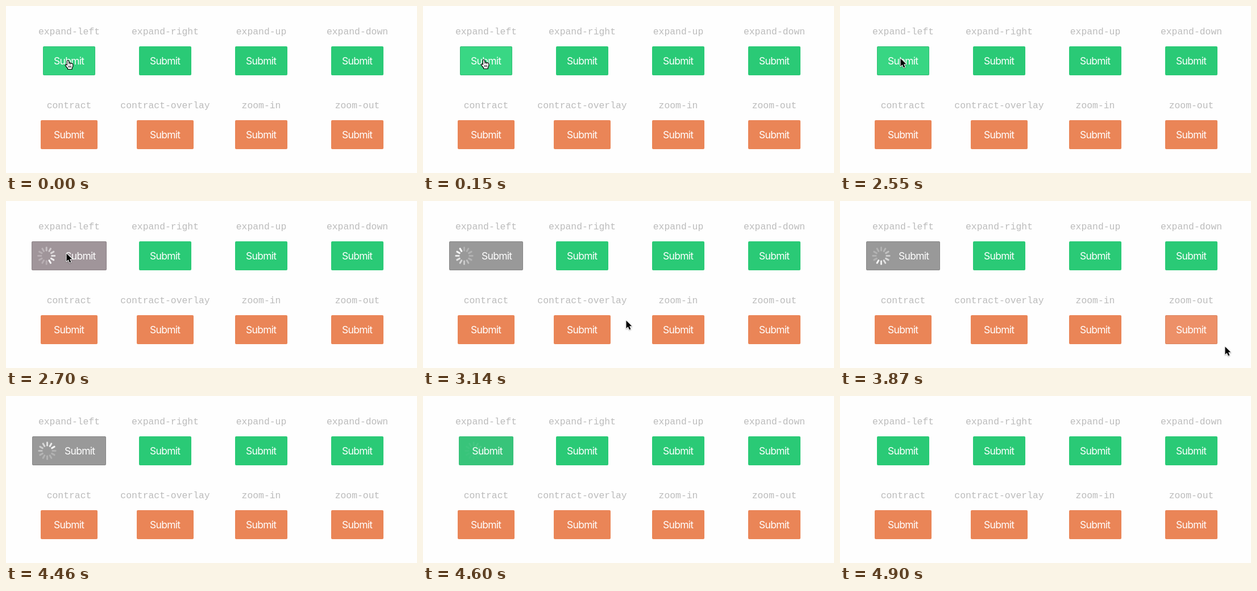
An HTML page with a canvas for the animation above (5.35 s loop, 723 px wide and 294 px high).

```html
<!DOCTYPE html>
<html lang="en">
<head>
<meta charset="utf-8">
<title>Loading buttons</title>
<style>
  html, body { margin: 0; width: 100%; height: 100%; overflow: hidden; background: #fefefe; }
  canvas { display: block; }
</style>
</head>
<body>
<canvas id="stage" width="723" height="294"></canvas>
<script>
const ctx = document.getElementById('stage').getContext('2d');
const LOOP = 5350;
const FADE = 300;
const STEPS = [0, 150, 2550, 2700, 2840, 2990, 3140, 3290, 3430, 3580, 3730,
  3870, 4020, 4160, 4310, 4460, 4600, 4750, 4900];

const GREEN = [42, 202, 118], GREEN_HOVER = [56, 214, 131];
const ORANGE = [234, 133, 87], ORANGE_HOVER = [239, 149, 112];
const GRAY = [153, 153, 153];

// label, centre x, top y, width, colour
const BUTTONS = [
  ['expand-left', 111, 71, 92, GREEN],
  ['expand-right', 280, 71, 92, GREEN],
  ['expand-up', 449, 71, 92, GREEN],
  ['expand-down', 618, 71, 92, GREEN],
  ['contract', 111, 201, 100, ORANGE],
  ['contract-overlay', 280, 201, 100, ORANGE],
  ['zoom-in', 449, 201, 92, ORANGE],
  ['zoom-out', 618, 201, 92, ORANGE]
];

// time, shape, tip x, tip y
const POINTER = [
  [0, 'hand', 109, 95], [150, 'hand', 107, 94], [2550, 'arrow', 106, 92],
  [3140, 'arrow', 357, 210], [3430, 'arrow', 447, 203], [3580, 'arrow', 579, 203],
  [3730, 'hand', 611, 211], [3870, 'arrow', 677, 256], [4160, 'arrow', 636, 280],
  [4310, null, 0, 0]
];

const ARROW = new Path2D('M.5 .5V14.2L3.7 11.2L6 16.4L8.4 15.4L6.1 10.3H10.4Z');
const HAND = new Path2D('M-1.6 9V1.8Q-1.5 .5 -.2 .5Q1.2 .5 1.4 1.8L1.9 5.2' +
  'Q3.6 4.3 4.5 5.8Q6 5.1 6.7 6.5Q8.6 6 8.7 8V11.2L7.2 14.6V16.5H-.4V15' +
  'L-4.4 10.2Q-5.2 8.6 -3.8 8.2Q-2.8 8 -1.6 9Z');

const clamp = (v, lo, hi) => Math.min(hi, Math.max(lo, v));
const mix = (a, b, k) => a.map((v, i) => v + (b[i] - v) * k);
const rgb = c => `rgb(${c.map(v => Math.round(clamp(v, 0, 255))).join(',')})`;
const curve = (u, a, b) => 3 * (1 - u) ** 2 * u * a + 3 * (1 - u) * u * u * b + u ** 3;

// cubic-bezier(.175, .885, .32, 1.275)
function spring(t, start) {
  const x = clamp((t - start) / FADE, 0, 1);
  if (x === 0 || x === 1) return x;
  let lo = 0, hi = 1;
  for (let i = 0; i < 24; i++) {
    const mid = (lo + hi) / 2;
    if (curve(mid, .175, .32) < x) lo = mid; else hi = mid;
  }
  return curve(lo, .885, 1.275);
}

function drawLabel(text, x, y) {
  ctx.font = '16.4px "Liberation Mono", monospace';
  ctx.letterSpacing = '0px';
  ctx.fillStyle = '#bbb';
  ctx.fillText(text, x, y);
}

function drawButton(x, y, w, color, edge, textX) {
  const left = Math.round(x - w / 2);
  const width = Math.round(x + w / 2) - left;
  ctx.fillStyle = rgb(color);
  ctx.beginPath();
  ctx.roundRect(left, y, width, 51, 2);
  ctx.fill();
  if (edge > 0) {
    ctx.strokeStyle = `rgba(0,0,0,${0.12 * Math.min(edge, 1)})`;
    ctx.lineWidth = 1;
    ctx.beginPath();
    ctx.roundRect(left + .5, y + .5, width - 1, 50, 1.5);
    ctx.stroke();
  }
  ctx.font = '17.5px Inter, sans-serif';
  ctx.letterSpacing = '-0.7px';
  ctx.fillStyle = '#fff';
  ctx.fillText('Submit', textX - .35, y + 32);
}

function drawSpinner(x, y, t, alpha) {
  const head = 11 / 12 + (t - 3140) / 1000;
  ctx.save();
  ctx.translate(x, y);
  ctx.fillStyle = '#fff';
  for (let i = 0; i < 12; i++) {
    const lag = (((head - i / 12 + .001) % 1) + 1) % 1;
    ctx.globalAlpha = alpha * Math.max(.25, 1 - .75 * lag / .6);
    ctx.beginPath();
    ctx.roundRect(-1.5, -16, 3, 8, 1.2);
    ctx.fill();
    ctx.rotate(Math.PI / 6);
  }
  ctx.restore();
}

function drawPointer(t) {
  const [, shape, x, y] = POINTER.findLast(p => p[0] <= t);
  if (!shape) return;
  ctx.save();
  ctx.translate(x, y);
  ctx.lineJoin = 'round';
  if (shape === 'arrow') {
    ctx.shadowColor = 'rgba(0,0,0,.3)';
    ctx.shadowBlur = 2;
    ctx.shadowOffsetY = 1;
    ctx.strokeStyle = '#fff';
    ctx.lineWidth = 2;
    ctx.stroke(ARROW);
    ctx.shadowColor = 'transparent';
    ctx.fillStyle = '#000';
    ctx.fill(ARROW);
  } else {
    ctx.fillStyle = '#fff';
    ctx.fill(HAND);
    ctx.strokeStyle = '#000';
    ctx.lineWidth = 1.2;
    ctx.stroke(HAND);
    ctx.lineWidth = .9;
    ctx.beginPath();
    for (const gx of [1.2, 3.2, 5.2]) {
      ctx.moveTo(gx, 10);
      ctx.lineTo(gx, 13.5);
    }
    ctx.moveTo(1.9, 5.2);
    ctx.lineTo(2, 8);
    ctx.moveTo(4.5, 5.8);
    ctx.lineTo(4.6, 8.2);
    ctx.stroke();
  }
  ctx.restore();
}

function draw(t) {
  ctx.fillStyle = '#fefefe';
  ctx.fillRect(0, 0, 723, 294);
  ctx.textAlign = 'center';

  const busy = spring(t, 2550) - spring(t, 4520);
  const loaded = t >= 4520;
  const hover = loaded ? 0 : spring(t, -50);
  const zoomHover = spring(t, 3560) - spring(t, 3850);

  for (const [label, x, y, w, base] of BUTTONS) {
    drawLabel(label, x, y - 21);
    if (label === 'expand-left') {
      const width = w + 38 * busy;
      const color = mix(mix(base, GREEN_HOVER, hover), GRAY, busy);
      drawButton(x, y, width, color, loaded ? busy : hover, x + 19 * busy);
      if (busy > 0) drawSpinner(x - width / 2 + 26.5, y + 25.5, t, Math.min(busy, 1));
    } else if (label === 'zoom-out') {
      drawButton(x, y, w, mix(base, ORANGE_HOVER, zoomHover), zoomHover, x);
    } else {
      drawButton(x, y, w, base, 0, x);
    }
  }
  drawPointer(t);
}

function tick() {
  const t = performance.now() % LOOP;
  draw(STEPS.findLast(s => s <= t));
  requestAnimationFrame(tick);
}
tick();
</script>
</body>
</html>
```
